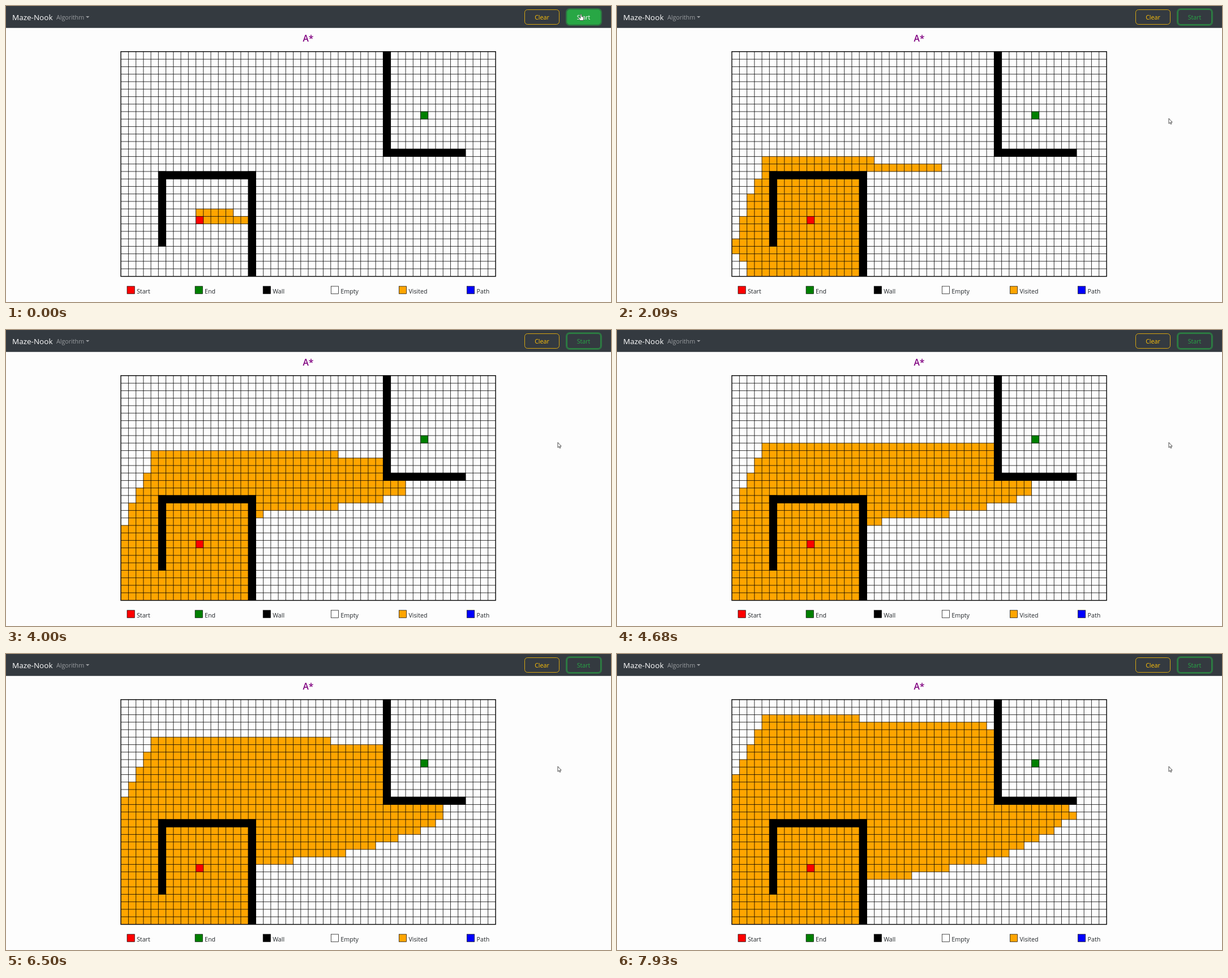
Write an HTML page that moves like this. It is 1069 px wide and 524 px high and loops after 8 s.

```html
<!DOCTYPE html>
<html lang="en">
<head>
<meta charset="utf-8">
<title>Pathfinding</title>
<style>
  html, body { margin: 0; width: 100%; height: 100%; overflow: hidden; background: #fdfdfd; }
  svg { display: block; width: 1069px; height: 524px; font: 10.7px "Open Sans", "Noto Sans", sans-serif; }
  .mid { text-anchor: middle; }
</style>
</head>
<body>
<svg id="stage" viewBox="0 0 1069 524">
  <rect width="1069" height="38.8" fill="#343a40"/>
  <text x="11" y="24.8" font-size="13.5" font-weight="500" fill="#fff">Maze-Nook</text>
  <text x="89" y="23.6" fill="#9a9da0">Algorithm</text>
  <path d="M141 18h6.4l-3.2 3.3z" fill="#9a9da0"/>
  <rect x="916.5" y="6.5" width="61" height="26" rx="5" fill="none" stroke="#ffc107" stroke-width=".8"/>
  <text class="mid" x="947" y="23.6" fill="#ffc107">Clear</text>
  <rect x="990" y="5" width="62" height="29" rx="6" fill="none" stroke="#28a745" stroke-opacity=".5" stroke-width="2.2"/>
  <rect id="startButton" x="991.4" y="6.4" width="59.2" height="26.2" rx="4.6" stroke="#28a745" stroke-width=".8"/>
  <text id="startLabel" class="mid" x="1020.5" y="23.6">Start</text>
  <text class="mid" x="534" y="62.8" font-size="15.6" font-weight="600" fill="#800080">A*</text>
  <g id="grid"></g>
  <g id="legend"></g>
  <g id="cursor" stroke-linejoin="round">
    <path id="arrow" d="M0 0V9.2L2.1 7.3 3.5 10.3 4.9 9.6 3.5 6.8H6.2Z" fill="#fff" stroke="#222" stroke-width=".8"/>
    <path id="hand" d="M-1 .8Q0-.6 1 .8V4.2L4.2 5Q5 5.3 5 6.2L4.2 11H-1.6L-4.2 7.2Q-4 5.8-2.5 6.3L-1 7.4Z" fill="#fff" stroke="#333" stroke-width=".7"/>
  </g>
</svg>
<script>
const COLS = 50, ROWS = 30, LOOP = 8000, LINE = .8;
const START = [10, 22], END = [40, 8];
const WALLS = [[35, 0, 1, 14], [35, 13, 11, 1], [5, 16, 13, 1], [5, 16, 1, 10], [17, 16, 1, 14]]; // col, row, width, height

// Screen step -> time in ms
const STEPS = [[0, 0], [1, 90], [10, 960], [19, 1820], [22, 2090], [28, 2660], [37, 3520], [46, 4390],
  [55, 5260], [64, 6120], [73, 6990], [82, 7830], [83, 7930], [84, 8030]];
// Screen step -> cells visited
const VISITED = [[0, 12], [10, 107], [22, 232], [42, 431], [57, 578], [68, 689], [83, 836]];
// Screen step -> pointer position
const POINTER_X = [[0, 1016], [2, 1016], [7, 974], [10, 971.3], [16, 978], [20, 975]];
const POINTER_Y = [[0, 14.5], [2, 15], [7, 192], [10, 203], [16, 200], [20, 199]];

const byId = id => document.getElementById(id);
const grid = byId("grid"), legend = byId("legend");

function add(parent, tag, attrs, text = "") {
  const node = document.createElementNS("http://www.w3.org/2000/svg", tag);
  for (const [name, value] of Object.entries(attrs)) node.setAttribute(name, value);
  node.textContent = text;
  return parent.appendChild(node);
}

// Centres of the grid lines
const colX = col => 203.15 + col * 13.235;
const rowY = row => 80.95 + row * 13.25;

// Fills cells; grow widens the block on every side
function block(col, row, width, height, fill, grow = .2) {
  return add(grid, "rect", {
    x: colX(col) - grow, y: rowY(row) - grow,
    width: colX(width) - colX(0) + 2 * grow, height: rowY(height) - rowY(0) + 2 * grow, fill
  });
}

const isWall = (c, r) => WALLS.some(([x, y, w, h]) => c >= x && c < x + w && r >= y && r < y + h);

// A* with four neighbours and straight-line distance; returns cells in visiting order
function search(limit) {
  const node = (c, r, g) => ({ c, r, g, f: g + Math.hypot(c - END[0], r - END[1]) });
  const open = [node(...START, 0)], best = new Map(), closed = new Set(), order = [];
  while (open.length && order.length < limit) {
    let pick = 0;
    open.forEach((n, i) => { if (n.f < open[pick].f - 1e-9) pick = i; });
    const { c, r, g } = open.splice(pick, 1)[0], key = r * COLS + c;
    if (closed.has(key)) continue;
    closed.add(key);
    order.push([c, r]);
    for (const [dc, dr] of [[0, -1], [1, 0], [0, 1], [-1, 0]]) {
      const nc = c + dc, nr = r + dr, next = nr * COLS + nc;
      if (nc < 0 || nr < 0 || nc >= COLS || nr >= ROWS || isWall(nc, nr)) continue;
      if (g + 1 >= (best.get(next) ?? Infinity)) continue;
      best.set(next, g + 1);
      open.push(node(nc, nr, g + 1));
    }
  }
  return order;
}

// Piecewise linear lookup; from and to choose the columns of the table
function lerp(table, value, from = 0, to = 1) {
  if (value <= table[0][from]) return table[0][to];
  for (let i = 1; i < table.length; i++) {
    const a = table[i - 1], b = table[i];
    if (value < b[from]) return a[to] + (b[to] - a[to]) * (value - a[from]) / (b[from] - a[from]);
  }
  return table.at(-1)[to];
}

const cells = search(VISITED.at(-1)[1]).map(([c, r]) => block(c, r, 1, 1, "#ffa500"));
block(...START, 1, 1, "#f00");
block(...END, 1, 1, "#008000");

let lines = "";
for (let c = 1; c < COLS; c++) lines += `M${colX(c)} ${rowY(0)}V${rowY(ROWS)}`;
for (let r = 1; r < ROWS; r++) lines += `M${colX(0)} ${rowY(r)}H${colX(COLS)}`;
add(grid, "path", { d: lines, stroke: "#000", "stroke-width": LINE, fill: "none" });
WALLS.forEach(wall => block(...wall, "#000", LINE / 2));
const frame = block(0, 0, COLS, ROWS, "none");
frame.setAttribute("stroke", "#000");
frame.setAttribute("stroke-width", 1.4);

[["Start", "#f00"], ["End", "#008000"], ["Wall", "#000"], ["Empty", "#fff"], ["Visited", "#ffa500"], ["Path", "#00f"]]
  .forEach(([name, fill], i) => {
    const x = 214 + i * 120.1;
    add(legend, "rect", { x, y: 496.1, width: 13.2, height: 13.2, fill, stroke: "#000", "stroke-width": .7 });
    add(legend, "text", { x: x + 17, y: 509.4, fill: "#212529" }, name);
  });

let shown = -1;
function draw(time) {
  // Screen times are rounded down to 10 ms, about a tenth of a step
  const step = Math.floor(lerp(STEPS, time, 1, 0) + .1);
  if (step === shown) return;
  shown = step;
  const count = Math.round(lerp(VISITED, step));
  cells.forEach((cell, i) => cell.setAttribute("visibility", i < count ? "visible" : "hidden"));

  const x = lerp(POINTER_X, step), y = lerp(POINTER_Y, step), hover = y < 34;
  byId("cursor").setAttribute("transform", `translate(${x} ${y})`);
  byId("hand").setAttribute("visibility", hover ? "visible" : "hidden");
  byId("arrow").setAttribute("visibility", hover ? "hidden" : "visible");
  byId("startButton").setAttribute("fill", hover ? "#28a745" : "#343a40");
  byId("startLabel").setAttribute("fill", hover ? "#fff" : "#28a745");
}

const begin = performance.now();
function tick() {
  draw((performance.now() - begin) % LOOP);
  requestAnimationFrame(tick);
}
tick();
</script>
</body>
</html>
```
